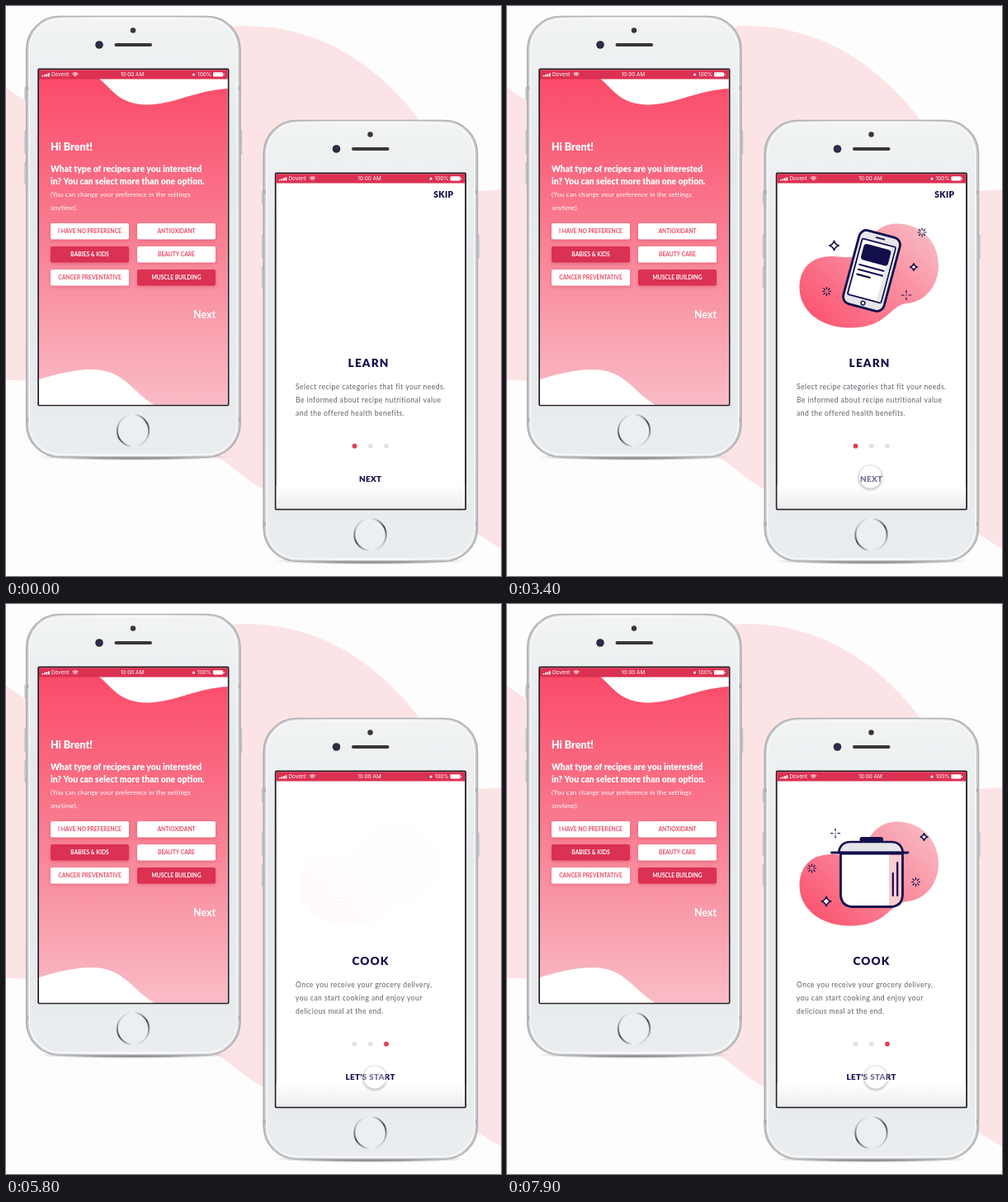
Recreate the animation shown at these times as an HTML page with a canvas. Size 600 px wide and 690 px high, loop 8000 ms.

```html
<!DOCTYPE html>
<html lang="en">
<head>
<meta charset="utf-8">
<title>Recipe app onboarding</title>
<style>
html, body { margin: 0; width: 100%; height: 100%; overflow: hidden; background: #fefdfe; }
canvas { display: block; width: 600px; height: 690px; }
</style>
</head>
<body>
<canvas id="stage"></canvas>
<script>
const LOOP = 8000, W = 600, H = 690;
const NAVY = '#120f4d', RED = '#db3152', GREY = '#e6e6ea', PINK = '#fbcdd0';
const canvas = document.getElementById('stage');
const ctx = canvas.getContext('2d');
const dpr = window.devicePixelRatio || 1;
canvas.width = W * dpr;
canvas.height = H * dpr;

const clamp = v => Math.max(0, Math.min(1, v));
const ease = u => (1 - Math.cos(Math.PI * clamp(u))) / 2;
const mix = (a, b, u) => a + (b - a) * u;

function addStops(g, stops) {
  stops.forEach((c, i) => g.addColorStop(i / (stops.length - 1), c));
  return g;
}

const gradient = (x0, y0, x1, y1, ...stops) => addStops(ctx.createLinearGradient(x0, y0, x1, y1), stops);

function shape(path, fill, stroke, width = 2.6) {
  const p = path instanceof Path2D ? path : new Path2D(path);
  if (fill) { ctx.fillStyle = fill; ctx.fill(p); }
  if (stroke) {
    ctx.strokeStyle = stroke;
    ctx.lineWidth = width;
    ctx.lineCap = ctx.lineJoin = 'round';
    ctx.stroke(p);
  }
}

function box(x, y, w, h, r, fill, stroke, width) {
  const p = new Path2D();
  p.roundRect(x, y, w, h, r);
  shape(p, fill, stroke, width);
}

function disc(x, y, r, fill, stroke, width) {
  const p = new Path2D();
  p.arc(x, y, r, 0, 7);
  shape(p, fill, stroke, width);
}

function text(str, x, y, size, weight, color, { align = 'left', gap = 0, font = 'Lato' } = {}) {
  ctx.font = `${weight} ${size}px ${font}, sans-serif`;
  ctx.letterSpacing = gap + 'px';
  ctx.textAlign = align;
  ctx.fillStyle = color;
  ctx.fillText(str, x + (align === 'center' ? gap / 2 : align === 'right' ? gap : 0), y);
}

function shadow(color, blur, dy) {
  ctx.shadowColor = color;
  ctx.shadowBlur = blur * dpr;
  ctx.shadowOffsetY = dy * dpr;
}

function at(x, y, draw) {
  ctx.save();
  ctx.translate(x, y);
  draw();
  ctx.restore();
}

function backdrop() {
  ctx.fillStyle = '#fefdfe';
  ctx.fillRect(0, 0, W, H);
  shape(`M0 98 C25 118 60 140 110 125 C175 95 200 24 290 24
    C390 24 460 82 505 143 C535 190 540 224 572 224 L600 222
    V657 C570 640 550 620 520 616 C460 610 370 612 312 585
    C286 571 272 554 255 546 C180 520 110 450 0 453 Z`, '#fce4e6');
}

function phoneBody() {
  const base = addStops(ctx.createRadialGradient(0, 0, 0, 0, 0, 118),
    ['rgba(50,50,55,.75)', 'rgba(75,75,80,.6)', 'rgba(120,120,125,0)']);
  at(154, 546, () => {
    ctx.scale(1, .035);
    disc(0, 0, 118, base);
  });

  [[98, 16], [151, 28], [189, 27]].forEach(([y, h]) => box(22.8, y, 3, h, 1, '#d7d8da', '#b3b4b6', .7));
  box(282.8, 151, 3, 29, 1, '#d7d8da', '#b3b4b6', .7);
  box(24.7, 12.5, 259.3, 533.5, 40,
    gradient(24, 0, 284, 0, '#c9cacc', '#f3f3f4', '#f3f3f4', '#c9cacc'), '#aeafb1', 1.6);
  [97, 498].forEach(y => {
    ctx.fillStyle = '#b0b1b3';
    ctx.fillRect(24, y, 4, 5);
    ctx.fillRect(280.5, y, 4, 5);
  });
  box(28.2, 15.5, 252.3, 527.5, 37, gradient(0, 15, 0, 543, '#f1f3f4', '#e5e9ec', '#e6eaec', '#e9edef'), '#fafafa', 1.6);

  disc(154, 29.5, 3.2, '#3b3637');
  disc(113, 47, 4.8, '#2d2b33');
  disc(113, 47, 2.2, '#22316b');
  box(131.5, 45, 45.5, 4, 2, '#3b3536');

  const metal = addStops(ctx.createConicGradient(-.5, 154, 514),
    ['#48484a', '#c4c5c6', '#f2f2f2', '#48484a', '#c4c5c6', '#f2f2f2', '#48484a']);
  disc(154, 514, 19.2, '#eceff1', metal, 2);
  box(39.2, 76.4, 230.4, 406.9, 1, '#fff', '#231e22', 1.8);
}

function statusBar() {
  ctx.fillStyle = RED;
  ctx.fillRect(40, 77.2, 228.7, 11.3);
  const label = (s, x, align) => text(s, x, 85, 6.4, 400, '#fff', { align, font: 'Inter' });
  ctx.fillStyle = '#fff';
  for (let i = 0; i < 4; i++) ctx.fillRect(43.5 + i * 2.5, 84 - i * .9, 1.8, 1.4 + i * .9);
  label('Dovent', 55);
  [1.6, 3.2, 4.8].forEach(r => {
    const p = new Path2D();
    p.arc(84, 85.4, r, Math.PI * 1.25, Math.PI * 1.75);
    shape(p, null, '#fff', 1);
  });
  label('10:00 AM', 153, 'center');
  disc(227.5, 83, 1.5, '#fff');
  label('100%', 249, 'right');
  box(251, 80.3, 12, 5.2, 1, '#fff');
  ctx.fillRect(263.5, 82, 1, 2);
}

function optionButton(label, col, row, chosen) {
  const x = 54 + col * 105, y = 263 + row * 28;
  ctx.save();
  shadow('rgba(190,40,75,.35)', 4, 1.5);
  box(x, y, 95, 19.5, 2, chosen ? RED : '#fff');
  ctx.restore();
  text(label, x + 47.5, y + 12.2, 6.7, 700, chosen ? '#fff' : '#ec4a67', { align: 'center' });
}

function preferences() {
  ctx.fillStyle = gradient(0, 88, 0, 483, '#fa4b69', '#f98093', '#f9bcc6');
  ctx.fillRect(40, 88, 228.7, 394.5);
  shape('M113 88 C129 101 137 119 171 119.5 C204 119 231 102 268.7 100 V88 Z', '#fff');
  shape('M40 452 C60 446 82 440 104 440 C142 440 152 466 179 482.5 H40 Z', '#fff');
  statusBar();

  text('Hi Brent!', 54, 175, 12.5, 900, '#fff');
  text('What type of recipes are you interested', 54, 200.5, 10.3, 900, '#fff');
  text('in? You can select more than one option.', 54, 215.5, 10.3, 900, '#fff');
  text('(You can change your preference in the settings', 54, 231, 7.9, 400, '#fff', { gap: .13 });
  text('anytime).', 54, 246.5, 7.9, 400, '#fff', { gap: .13 });

  optionButton('I HAVE NO PREFERENCE', 0, 0);
  optionButton('ANTIOXIDANT', 1, 0);
  optionButton('BABIES & KIDS', 0, 1, true);
  optionButton('BEAUTY CARE', 1, 1);
  optionButton('CANCER PREVENTATIVE', 0, 2);
  optionButton('MUSCLE BUILDING', 1, 2, true);
  text('Next', 254, 378, 12.4, 700, '#fff', { align: 'right' });
}

function blob() {
  shape(`M354.5 341 C354.5 316 371 302.5 394 303 C414 304 425 308 434.5 291
    C444 272 456 263.5 473 263.5 C502 264 523 285 523 314
    C523 340 506 358 485 360 C463 362 462 389.5 416 389.5
    C381 390 354.5 369 354.5 341 Z`, gradient(385, 390, 500, 272, '#fb5671', '#fa8498', '#f8b5bf'));
}

const sparkle = {
  star(r) {
    const k = r * .22;
    shape(`M0 ${-r} Q${k} ${-k} ${r} 0 Q${k} ${k} 0 ${r} Q${-k} ${k} ${-r} 0 Q${-k} ${-k} 0 ${-r} Z`, '#fff', NAVY, 1.5);
  },
  rays(r, n = 8) {
    for (let i = 0; i < n; i++) {
      const c = Math.cos(i * 2 * Math.PI / n), s = Math.sin(i * 2 * Math.PI / n);
      shape(`M${c * r * .55} ${s * r * .55} L${c * r} ${s * r}`, null, NAVY, 1.2);
    }
  },
  cross(r) {
    sparkle.rays(r, 4);
    disc(0, 0, .7, NAVY);
  }
};

function drawPhoneIcon() {
  at(442, 320.5, () => {
    ctx.rotate(Math.PI / 12);
    box(-25.5, -46, 51, 92, 9, GREY, NAVY, 2.8);
    box(-21, -35, 42, 70, 2, '#fff', NAVY, 1.8);
    shape('M15 -34 H20 V34 H15 Z', GREY);
    box(-17, -30, 34, 20, 4, NAVY);
    shape('M-16 -3.5 H14 M-16 2.5 H14 M-16 8.5 H0', null, NAVY, 2.2);
    shape('M-5 -40.5 H5', null, NAVY, 1.8);
    disc(0, 40.5, 2.3, '#fff', NAVY, 1.5);
  });
}

function drawBag() {
  // leaves and carrot
  shape('M420 269 Q406 266 405 257 Q416 258 420 269 Q412 258 418 252 Q424 260 421 269 Q422 261 431 260 Q430 267 421 269',
    '#fff', NAVY, 2);
  shape('M413 279 Q412 269 421 269 Q431 269 431 279 L429 312 H418 Z', GREY, NAVY);
  shape('M414 282 H419 M426 288 H430 M417 295 H421', null, NAVY, 1.7);
  // bread
  at(470, 293, () => {
    ctx.rotate(.46);
    box(-9, -22, 18, 46, 9, GREY, NAVY);
    for (let y = -13; y < 14; y += 8) shape(`M-4 ${y + 3} Q0 ${y - 3} 4 ${y}`, null, NAVY, 1.7);
  });
  shape('M429 311 Q424 299 433 298 Q436 289 443 293 Q451 290 453 298 Q461 301 457 311 Z', PINK, NAVY, 2.3);
  shape('M397 311 Q393 299 403 297 Q409 300 414 297 Q424 299 421 311 Z', '#fff', NAVY, 2.4);
  const body = 'M396 311.5 H478 L474 371 Q473 380 464 380 H410 Q401 380 400 371 Z';
  shape(body, '#fff');
  shape('M457.5 312 H477 L473 371 Q472 379 464 379 H457.5 Z', PINK);
  shape(body, null, NAVY, 2.8);
  shape('M409 352 H422 M409 359 H430 M409 366 H432 M439 366 H446', null, NAVY, 2);
}

function drawPot() {
  shape('M402 301 Q404 288 416 288 H466 Q478 288 480 301 Z', GREY, NAVY);
  box(427.5, 282, 28.5, 6, 2.5, NAVY);
  const body = 'M404.5 302 V351 Q404.5 366.5 420 366.5 H464 Q479.5 366.5 479.5 351 V302 Z';
  shape(body, '#fff');
  shape('M463 303 H478.5 V350 Q478 362 468 365 H463 Z', PINK);
  shape(body, null, NAVY, 2.8);
  shape('M393.5 301 H486', null, NAVY, 2.8);
  shape('M467.8 326 V353 M473.2 313 V353', null, NAVY, 2.2);
}

const pages = [
  {
    start: 600, title: 'LEARN', titleX: 439, action: 'NEXT', draw: drawPhoneIcon,
    from: .4, pivot: [441, 321], sparkPivot: [441, 321],
    lines: ['Select recipe categories that fit your needs.', 'Be informed about recipe nutritional value',
      'and the offered health benefits.'],
    sparks: [['star', 396.5, 290, 5.8], ['rays', 503, 274, 5], ['star', 493, 316, 4.3],
      ['cross', 484, 350, 5.5], ['rays', 387.5, 345.5, 5]]
  },
  {
    start: 3500, title: 'SHOP', titleX: 442, action: 'NEXT', draw: drawBag,
    from: .5, pivot: [437, 337], sparkPivot: [353, 252],
    lines: ['Browse and shop for delicious recipes.', 'Choose the ingredients you need for the',
      'recipe and have the ingredients delivered', 'directly to your door.'],
    sparks: [['star', 448, 258, 5.8], ['rays', 505, 268.5, 5], ['cross', 381.5, 286.5, 5.5],
      ['star', 501, 328, 5.8], ['rays', 358.5, 353, 5]]
  },
  {
    start: 5700, title: 'COOK', titleX: 441.5, action: 'LET’S START', draw: drawPot,
    from: .23, pivot: [388, 380], sparkPivot: [511, 366],
    lines: ['Once you receive your grocery delivery,', 'you can start cooking and enjoy your',
      'delicious meal at the end.'],
    sparks: [['cross', 398, 277.5, 5.5], ['star', 505.5, 282, 4.3], ['rays', 369.5, 320, 5],
      ['rays', 495.5, 336.5, 5], ['star', 387, 360, 5.8]]
  }
];

function scaled([x, y], s, draw) {
  ctx.save();
  ctx.translate(x, y);
  ctx.scale(s, s);
  ctx.translate(-x, -y);
  draw();
  ctx.restore();
}

function illustration(page, t) {
  const p = ease((t - page.start) / 1000);
  if (p <= 0) return;
  ctx.save();
  ctx.globalAlpha = p;
  blob();
  scaled(page.pivot, mix(page.from, 1, p), page.draw);
  scaled(page.sparkPivot, p, () => {
    page.sparks.forEach(([kind, x, y, r]) => at(x, y, () => sparkle[kind](r)));
  });
  ctx.restore();
}

function touch(t) {
  const shown = clamp((t - 2200) / 200);
  if (!shown) return;
  const arrive = ease((t - 2350) / 800), nudge = ease((t - 5300) / 300);
  const x = mix(556, 440.5, arrive) + 6.5 * nudge;
  const y = mix(608, 570, arrive) + 3 * nudge;
  ctx.save();
  ctx.globalAlpha = shown;
  const halo = addStops(ctx.createRadialGradient(x, y + 1, 13, x, y + 1, 17),
    ['rgba(130,130,145,.42)', 'rgba(130,130,145,0)']);
  const ring = new Path2D();
  ring.arc(x, y + 1, 17, 0, 7);
  ring.arc(x, y, 13.5, 0, 7, true);
  ctx.fillStyle = halo;
  ctx.fill(ring, 'evenodd');
  disc(x, y, 13.7, 'rgba(255,255,255,.42)');
  ctx.restore();
}

function onboarding(t) {
  const index = t < pages[1].start ? 0 : t < pages[2].start ? 1 : 2;
  const page = pages[index];
  ctx.fillStyle = gradient(0, 580, 0, 608, '#ffffff', '#ededee');
  ctx.fillRect(327.7, 580, 228.4, 28.3);
  if (index < 2) text('SKIP', 542, 232, 10.3, 900, NAVY, { align: 'right', gap: .3 });
  illustration(page, t);
  text(page.title, page.titleX, 436.8, 13.7, 900, NAVY, { align: 'center', gap: 1.1 });
  page.lines.forEach((line, i) => text(line, 351, 464 + i * 16, 8.6, 400, '#5f5e69', { gap: .42 }));
  [422.5, 441.8, 461].forEach((x, i) => disc(x, 532.7, 2.9, i === index ? '#e23f5b' : '#e2e0e8'));
  text(page.action, 441.5, 576.3, 9.9, 900, NAVY, { align: 'center', gap: .3 });
  touch(t);
}

function frame(now) {
  const t = now % LOOP;
  ctx.setTransform(dpr, 0, 0, dpr, 0, 0);
  backdrop();
  phoneBody();
  preferences();
  at(287.5, 126, () => {
    phoneBody();
    statusBar();
  });
  onboarding(t);
  requestAnimationFrame(frame);
}
requestAnimationFrame(frame);
</script>
</body>
</html>
```
